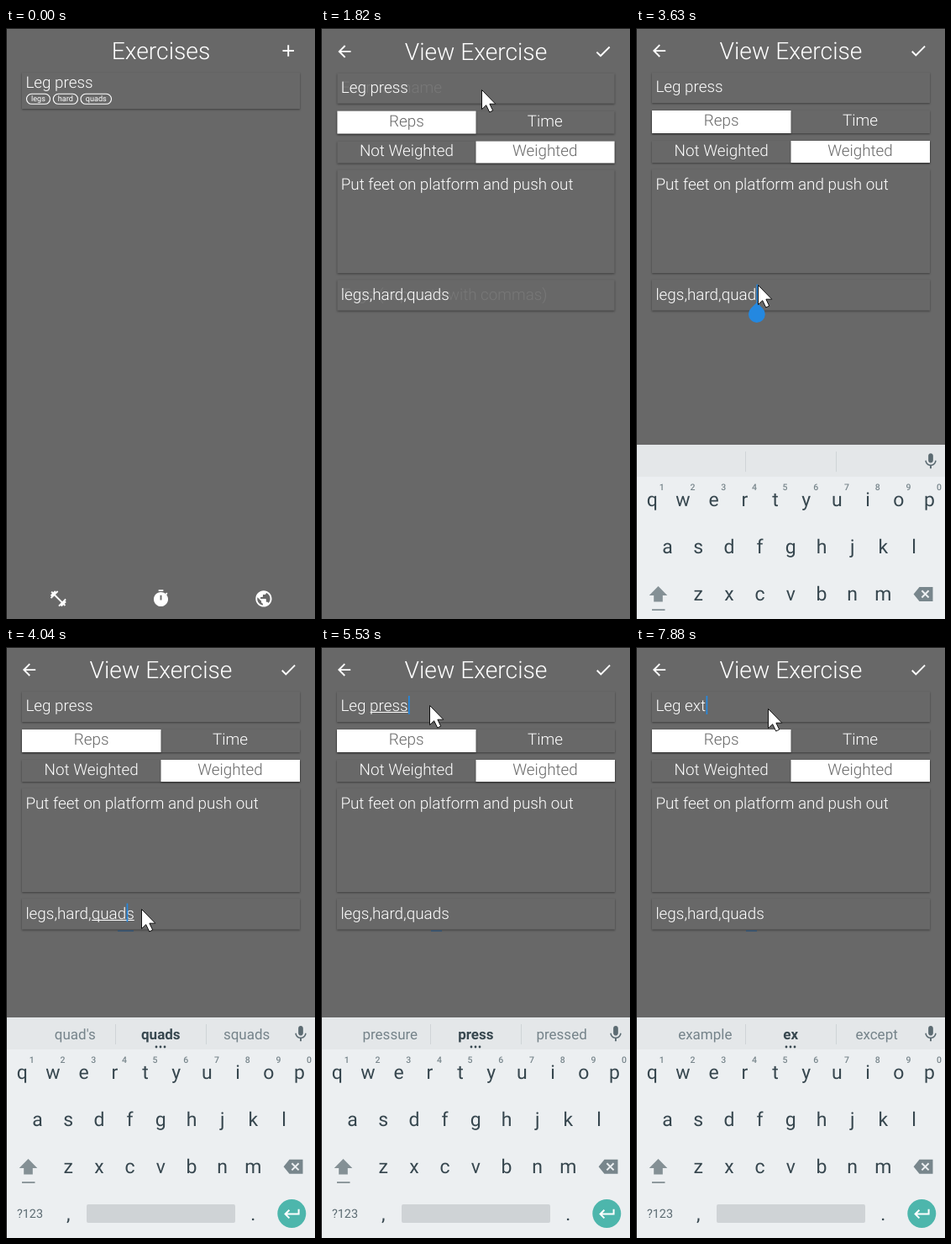
An HTML page that plays this animation: 368 px wide and 702 px high, repeating every 8000 ms.

```html
<!DOCTYPE html>
<html lang="en">
<head>
<meta charset="utf-8">
<title>Exercise editor</title>
<style>
  html, body { margin: 0; width: 100%; height: 100%; overflow: hidden; background: #686868; }
  svg { display: block; width: 368px; height: 702px; font-family: Roboto, "Open Sans", sans-serif; }
  text { white-space: pre; text-rendering: geometricPrecision; }
  .light { font-weight: 300; font-size: 18.85px; fill: #fff; }
  .title { font-weight: 300; font-size: 28.25px; fill: #fff; }
  .tag { font-weight: 400; font-size: 9.1px; fill: #fff; }
  .mid { text-anchor: middle; }
  .card { fill: #686868; filter: drop-shadow(0 1.6px 1.1px rgba(0,0,0,.42)); }
  .on { fill: #fff; filter: drop-shadow(0 1.6px 1.1px rgba(0,0,0,.42)); }
  .grey { fill: #686868; }
  .key { font-size: 23px; fill: #37474f; }
  .digit { font-size: 10.5px; font-weight: 500; fill: #78868c; }
  .word { font-size: 17px; fill: #75838a; }
  .best { font-weight: 700; fill: #37474f; }
</style>
</head>
<body>
<svg viewBox="0 0 368 702">
  <rect width="368" height="702" fill="#686868"/>

  <g id="list">
    <text class="title mid" x="184.5" y="37">Exercises</text>
    <path d="M329.5 27h13.4M336.2 20.3v13.4" stroke="#fff" stroke-width="1.9"/>
    <rect class="card" x="19" y="53" width="331" height="43"/>
    <text class="light" x="23.4" y="71.2">Leg press</text>
    <g id="tags"></g>
    <path transform="translate(50.9 666.4) scale(.95)" fill="#fff" d="M20.57 14.86L22 13.43 20.57 12 17 15.57 8.43 7 12 3.43 10.57 2 9.14 3.43 7.71 2 5.57 4.14 4.14 2.71 2.71 4.14l1.43 1.43L2 7.71l1.43 1.43L2 10.57 3.43 12 7 8.43 15.57 17 12 20.57 13.43 22l1.43-1.43L16.29 22l2.14-2.14 1.43 1.43 1.43-1.43-1.43-1.43L22 16.29z"/>
    <path transform="translate(173.1 666.2) scale(.95)" fill="#fff" fill-rule="evenodd" d="M15 1H9v2h6V1zm-4 13h2V8h-2v6zm8.03-6.61l1.42-1.42c-.43-.51-.9-.99-1.41-1.41l-1.42 1.42C16.07 4.74 14.12 4 12 4c-4.97 0-9 4.03-9 9s4.02 9 9 9 9-4.03 9-9c0-2.12-.74-4.07-1.97-5.61z"/>
    <path transform="translate(295.4 666.4) scale(.96)" fill="#fff" d="M12 2C6.48 2 2 6.48 2 12s4.48 10 10 10 10-4.48 10-10S17.52 2 12 2zm-1 17.93c-3.95-.49-7-3.85-7-7.93 0-.62.08-1.21.21-1.79L9 15v1c0 1.1.9 2 2 2v1.93zm6.9-2.54c-.26-.81-1-1.39-1.9-1.39h-1v-3c0-.55-.45-1-1-1H8v-2h2c.55 0 1-.45 1-1V7h2c1.1 0 2-.9 2-2v-.41c2.93 1.19 5 4.06 5 7.41 0 2.08-.8 3.97-2.1 5.39z"/>
  </g>

  <g id="view">
    <rect width="368" height="702" fill="#686868"/>
    <path transform="translate(16.2 15.7) scale(.95)" fill="#fff" d="M20 11H7.83l5.59-5.59L12 4l-8 8 8 8 1.41-1.41L7.83 13H20v-2z"/>
    <text class="title mid" x="184.5" y="37">View Exercise</text>
    <path transform="translate(324.8 15.7) scale(.95)" fill="#fff" d="M9 16.17L4.83 12l-1.42 1.41L9 19 21 7l-1.41-1.41z"/>
    <rect class="card" x="19" y="53" width="331" height="36"/>
    <rect class="card" x="19" y="98" width="331" height="27"/>
    <rect class="on" x="19" y="98" width="165.5" height="27"/>
    <rect class="card" x="19" y="134" width="331" height="26"/>
    <rect class="on" x="184.5" y="134" width="165.5" height="26"/>
    <rect class="card" x="19" y="168" width="331" height="123"/>
    <rect class="card" x="19" y="299" width="331" height="36.5"/>
    <g id="hints">
      <text class="light" x="23.4" y="76">Exercise name</text>
      <text class="light" x="23.4" y="322.5">Tags (separate with commas)</text>
    </g>
    <text id="name" class="light" x="23.4" y="76"></text>
    <text class="light mid" style="fill:#686868" x="101.7" y="116.3">Reps</text>
    <text class="light mid" x="267" y="116.3">Time</text>
    <text class="light mid" x="101.7" y="151.8">Not Weighted</text>
    <text class="light mid" style="fill:#686868" x="267" y="151.8">Weighted</text>
    <text class="light" x="23.4" y="191.7">Put feet on platform and push out</text>
    <text id="labels" class="light" x="23.4" y="322.5">legs,hard,quads</text>
    <rect id="underline" height="1" fill="#fff"/>
    <rect id="trace" y="336.5" height="1.3" fill="#2c5378"/>
    <rect id="caret" width="1.7" height="22" fill="#2488e0"/>
    <path id="handle" d="M0 0L7 7A9.9 9.9 0 1 1 -7 7Z" fill="#2488e0"/>
  </g>

  <g id="keyboard">
    <rect y="440" width="368" height="262" fill="#eceff1"/>
    <rect y="440" width="368" height="38" fill="#e4e7e9"/>
    <path d="M130.5 448v24M238.5 448v24" stroke="#cfd4d7"/>
    <g id="words">
      <text class="word mid" x="82.3" y="466"></text>
      <text class="word best mid" x="184.3" y="466"></text>
      <text class="word mid" x="286.6" y="466"></text>
      <path d="M179 475h.01M184 475h.01M189 475h.01" stroke="#37474f" stroke-width="2.8" stroke-linecap="round"/>
    </g>
    <path transform="translate(339.6 448.2) scale(.95)" fill="#5c6b72" d="M12 14c1.66 0 3-1.34 3-3V5c0-1.66-1.34-3-3-3S9 3.34 9 5v6c0 1.66 1.34 3 3 3zm5.3-3c0 3-2.54 5.1-5.3 5.1S6.7 14 6.7 11H5c0 3.41 2.72 6.23 6 6.72V21h2v-3.28c3.28-.48 6-3.3 6-6.72h-1.7z"/>
    <g id="keys"></g>
    <path d="M26.5 608L37.3 619H31.8V626.5H21.2V619H15.7Z" fill="#849095"/>
    <path d="M19 636h15.5" stroke="#849095" stroke-width="1.8"/>
    <path d="M337.5 608.8H353.5V625.8H337.5L330.6 617.3Z" fill="#78868c"/>
    <path d="M340.4 613.2l8.2 8.2M348.6 613.2l-8.2 8.2" stroke="#eceff1" stroke-width="2"/>
    <text class="mid" x="28.5" y="678" font-size="14.4" fill="#5c6b72">?123</text>
    <rect x="96" y="662" width="177" height="22" rx="2" fill="#cfd3d6"/>
    <circle cx="340.3" cy="673" r="17" fill="#4db6ac"/>
    <path d="M348.6 667.8V673.6H333.2M337.4 668.8L332.6 673.6L337.4 678.4" fill="none" stroke="#fff" stroke-width="2"/>
  </g>

  <g id="pointer">
    <circle id="press" r="18" fill="#b1ad30"/>
    <path d="M.5 .5V23.6L5.7 18.7L9.7 27L13.7 25.1L9.9 17.2H16.8Z" fill="#fff" stroke="#111" stroke-width="1"/>
  </g>
  <path d="M0 .5H368M.5 0V702" stroke="#1c1c1c"/>
</svg>

<script>
const LOOP = 8000;
const LEFT = 23.4;
const $ = id => document.getElementById(id);
const clamp = v => Math.max(0, Math.min(1, v));
const span = (t, a, b) => clamp((t - a) / (b - a));
const between = (t, a, b) => t >= a && t < b;
const easeOut = (p, n = 3) => 1 - (1 - p) ** n;
const smooth = p => p * p * (3 - 2 * p);
const show = (node, on) => node.setAttribute('visibility', on ? 'visible' : 'hidden');
const latest = (steps, t) => steps.filter(s => s[0] <= t).pop();

function set(node, attrs) {
  for (const k in attrs) node.setAttribute(k, attrs[k]);
}

function add(parent, tag, attrs, text = '') {
  const node = document.createElementNS('http://www.w3.org/2000/svg', tag);
  set(node, attrs);
  node.textContent = text;
  parent.append(node);
}

[['legs', 24.5, 28], ['hard', 56.3, 29.2], ['quads', 89, 36.5]].forEach(([word, x, w]) => {
  add($('tags'), 'rect', { x, y: 78.3, width: w, height: 12, rx: 6, fill: 'none', stroke: '#fff', 'stroke-width': 1.1 });
  add($('tags'), 'text', { x: x + w / 2, y: 87.1, class: 'tag mid' }, word);
});

[['qwertyuiop', 19.2, 513], ['asdfghjkl', 37.5, 569], ['zxcvbnm', 74.2, 625]].forEach(([row, x0, y], r) => {
  [...row].forEach((ch, i) => {
    const x = x0 + 36.7 * i;
    add($('keys'), 'text', { x, y, class: 'key mid' }, ch);
    if (r === 0) add($('keys'), 'text', { x: x + 11.6, y: 493.5, class: 'digit mid' }, (i + 1) % 10);
  });
});
add($('keys'), 'text', { x: 74.2, y: 681, class: 'key mid' }, ',');
add($('keys'), 'text', { x: 294.3, y: 681, class: 'key mid' }, '.');

// Start, end, from, bend, to, easing
const moves = [
  [190, 610, [277, 459], [222, 250], [194, 73], easeOut],
  [1030, 1140, [194, 73], [192, 73], [191, 73], smooth],
  [2090, 2790, [191, 73], [238, 190], [145, 305], smooth],
  [3840, 4040, [145, 305], [152, 306], [161, 311], smooth],
  [4040, 4250, [161, 311], [162, 315], [161, 317], smooth],
  [4780, 5200, [161, 317], [211, 190], [129, 69], smooth],
  [5535, 5740, [129, 69], [143, 70], [157, 73], smooth]
];
const presses = [[1480, 1680], [3060, 3260], [4390, 4600], [5200, 5400]];

const names = [
  [0, 'Leg press'], [6470, 'Leg pres'], [6610, 'Leg pre'], [6680, 'Leg pr'],
  [6740, 'Leg p'], [6880, 'Leg '], [7150, 'Leg e'], [7350, 'Leg ex'], [7880, 'Leg ext']
];
const suggestions = [
  [0, ''], [3900, "quad's quads squads"], [5470, 'pressure press pressed'],
  [6540, 'present pres presence'], [6680, 'pretty pre previous'], [6810, 'please p people'],
  [6950, 'is and day'], [7220, 'even e every'], [7420, 'example ex except']
];
// Moments the caret is shown afresh and starts to blink
const wakes = [[0], [3600], [4600], [5400], [5570], ...names.slice(1)];

function movePointer(t) {
  const [a, b, p, q, r, ease] = latest(moves, t) || moves[0];
  const k = ease(span(t, a, b));
  const at = i => (1 - k) ** 2 * p[i] + 2 * k * (1 - k) * q[i] + k * k * r[i];
  set($('pointer'), { transform: `translate(${at(0)} ${at(1)})` });
  show($('pointer'), t >= 190);
  show($('press'), t >= 190 && presses.some(([on, off]) => between(t, on, off)));
}

function widthOf(node, count) {
  return count ? node.getSubStringLength(0, count) : 0;
}

function drawEditing(t) {
  const name = latest(names, t)[1];
  if ($('name').textContent !== name) $('name').textContent = name;

  const inName = t >= 5400;
  const field = inName ? $('name') : $('labels');
  const text = field.textContent;
  const place = !inName && t < 4600 ? text.length - 1 : text.length;
  const x = LEFT + widthOf(field, place);
  const age = t - latest(wakes, t)[0];
  set($('caret'), { x: x + .4, y: inName ? 58 : 304.5 });
  show($('caret'), t >= 3350 && (t < 3600 || age % 1000 < 500));

  const start = inName ? 4 : 10;
  const from = widthOf(field, start);
  set($('underline'), {
    x: LEFT + from + .5,
    y: inName ? 77 : 324,
    width: Math.max(0, widthOf(field, text.length) - from - .5)
  });
  show($('underline'), between(t, 3900, 5400) || between(t, 5470, 7880));

  set($('handle'), { transform: `translate(${x + .7} 326)` });
  show($('handle'), between(t, 3350, 3900) || between(t, 4710, 5400));
  set($('trace'), inName ? { x: 131, width: 13 } : { x: 133, width: 19 });
  show($('trace'), t >= 3900);
}

function drawKeyboard(t) {
  const up = easeOut(span(t, 3400, 3970));
  set($('keyboard'), { transform: `translate(0 ${262 * (1 - up)})` });
  show($('keyboard'), t >= 3400);
  const words = latest(suggestions, t)[1].split(' ');
  document.querySelectorAll('#words text').forEach((node, i) => {
    node.textContent = words[i] || '';
  });
  $('words').setAttribute('opacity', t >= 3900 ? 1 : 0);
}

function draw(t) {
  const p = span(t, 1650, 1960);
  const scale = .94 + .06 * easeOut(p, 4);
  set($('view'), {
    transform: `translate(184 351) scale(${scale}) translate(-184 -351)`,
    opacity: span(t, 1650, 1790)
  });
  set($('hints'), { opacity: .22 * (1 - p) });
  movePointer(t);
  drawEditing(t);
  drawKeyboard(t);
}

const begin = performance.now();
function tick() {
  draw((performance.now() - begin) % LOOP);
  requestAnimationFrame(tick);
}
tick();
</script>
</body>
</html>
```
